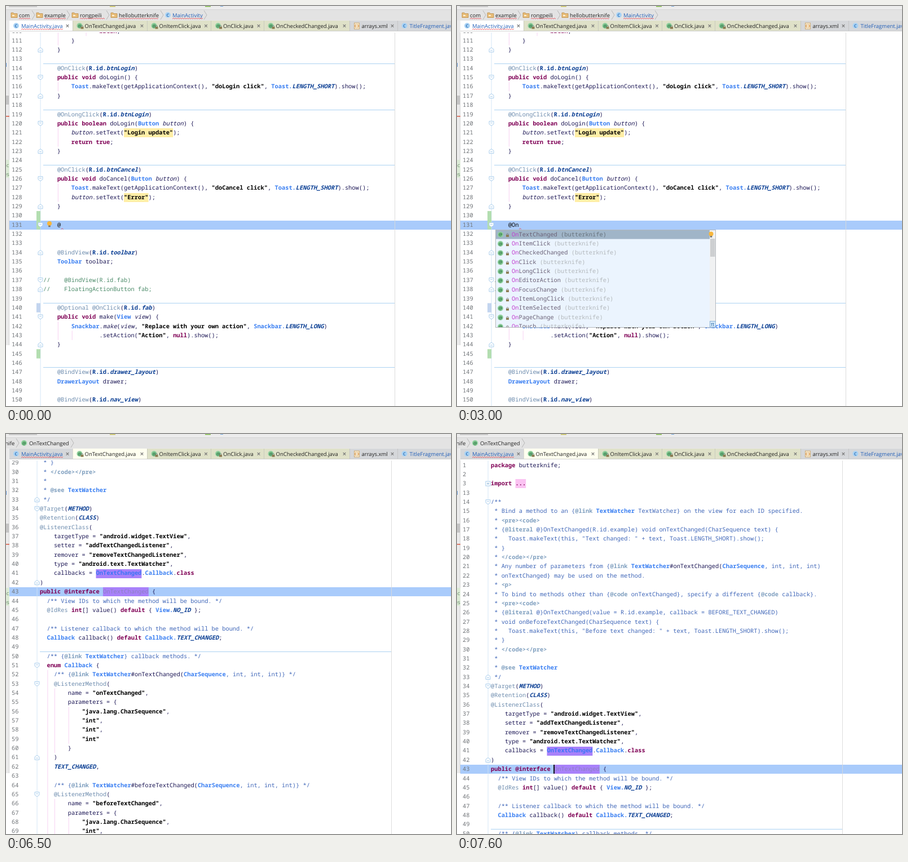
An HTML page for the animation above (8000 ms loop, 789 px wide and 710 px high).

```html
<!DOCTYPE html>
<html lang="en">
<head>
<meta charset="utf-8">
<title>Code editor: annotation completion</title>
<style>
html, body { margin: 0; width: 100%; height: 100%; overflow: hidden; background: #fff; }
svg { display: block; width: 789px; height: 710px; }
text { white-space: pre; text-rendering: geometricPrecision; font: 10.367px "Noto Sans Mono", monospace; }
.ui { font: 9.5px "Open Sans", sans-serif; }
.num { fill: #707478; }
.n { fill: #1c1755; }
.k { fill: #7f0055; font-weight: 700; }
.t { fill: #3a7ff2; font-weight: 600; }
.a { fill: #6d8cae; }
.s, .h { fill: #000; font-weight: 700; }
.c { fill: #0b3f94; font-weight: 700; font-style: italic; }
.r { fill: #0b3f94; font-weight: 700; }
.i { fill: #1c1755; font-style: italic; }
.g { fill: #4a8a68; }
.d { fill: #3f66b8; }
.l { fill: #7f9fbf; font-weight: 600; }
.p { fill: #3a76f5; font-weight: 600; }
.q { fill: #8d82c2; }
.b { fill: #111; }
.e { fill: #6b0f33; font-weight: 500; }
</style>
</head>
<body>
<svg viewBox="0 0 789 710">
  <defs>
    <clipPath id="editor"><rect x="6" y="47" width="783" height="663"/></clipPath>
    <clipPath id="list"><rect x="68" y="397" width="391" height="173"/></clipPath>
  </defs>
  <g id="frame"></g>
  <g id="crumbs"></g>
  <g id="tabs"></g>
  <g clip-path="url(#editor)">
    <g id="main"></g>
    <g id="lib"></g>
  </g>
  <g id="overlay"></g>
</svg>
<script>
const CW = 6.22, ROW = 16.35, LOOP = 8000;
const MAIN_X = 66, LIB_X = 60, CARET_TOP = 380.3;
const $ = id => document.getElementById(id);

const esc = s => s.replace(/&/g, '&amp;').replace(/</g, '&lt;');
const rect = (x, y, w, h, fill, more = '') =>
  `<rect x="${x}" y="${y}" width="${w}" height="${h}" fill="${fill}" ${more}/>`;
// A box behind one text row, on whole pixels
const band = (x, y, w, fill, more) => rect(x, Math.ceil(y), w, 16, fill, more);
const path = (d, stroke, fill = 'none', w = 1) =>
  `<path d="${d}" stroke="${stroke}" fill="${fill}" stroke-width="${w}"/>`;
const text = (x, y, s, cls, more = '') =>
  `<text x="${x}" y="${y}" class="${cls}" ${more}>${esc(s)}</text>`;
const label = (x, y, s, fill = '#222') => text(x, y, s, 'ui', `fill="${fill}"`);

function wave(x, w, y) {
  let d = `M${x} ${y}`;
  for (let i = 1; i * 2 <= w; i++) d += `L${x + i * 2} ${y + (i % 2 ? -1.6 : 0)}`;
  return path(d, '#e8404a', 'none', 0.8);
}

function badge(x, y, letter, fill, ink) {
  return `<circle cx="${x}" cy="${y}" r="5" fill="${fill}"/>` +
    text(x, y + 2.7, letter, 'ui', `fill="${ink}" text-anchor="middle" style="font-size:7.5px;font-weight:600"`);
}
const classIcon = (x, y) => badge(x, y, 'C', '#a9d3f5', '#1d5fa8');
const noteIcon = (x, y) => badge(x, y, '@', '#8ecf9c', '#1f6b38');
const lock = (x, y) => rect(x, y, 5, 3.6, '#8a7a50') +
  path(`M${x + 1} ${y}v-1.5q1.5-1.6 3 0v1.5`, '#777', 'none', 0.9);
const folder = x => path(`M${x} 12h4l1 1.5h6v7h-11z`, '#b98a45', '#e8bd78', 0.8) + rect(x + 2, 16, 4, 2, '#fff2d8');
const chevron = x => path(`M${x - 2} 8l5 8l-5 8`, '#b0b0b0', 'none', 0.9);
const bulb = (x, y) => `<circle cx="${x}" cy="${y}" r="4" fill="#f7b63c"/>` +
  rect(x - 1.8, y + 3.6, 3.6, 2.6, '#77736b');

// "^x" switches to style x
function code(src, x, y) {
  let col = 0, back = '', out = '';
  for (const part of ('^n' + src).split('^').slice(1)) {
    const cls = part[0], s = part.slice(1), at = x + col * CW;
    const fill = { h: '#ffeea6', p: '#a881fa', q: '#a881fa' }[cls];
    if (fill) back += band(at, y, s.length * CW, fill);
    if (s.trim()) out += text(at, y + 11.4, s, cls);
    col += s.length;
  }
  return back + out;
}

function fold(x, y, kind) {
  const c = y + ROW / 2;
  if (kind === '+')
    return rect(x - 4, c - 4, 8, 8, '#fff', 'stroke="#a9cdec"') + path(`M${x - 2} ${c}h4M${x} ${c - 2}v4`, '#8fb6d8');
  const s = kind === 'v' ? 1 : -1;
  return path(`M${x - 4} ${c - 4 * s}h8v${5 * s}l-4 ${3 * s}l-4 ${-3 * s}z`, '#a9cdec', '#fff') +
    path(`M${x - 2} ${c - s}h4`, '#a9cdec');
}

// Draws one file; top(n) gives the upper edge of line n
function sheet(o) {
  const { x, top, active } = o, gx = x - 5;
  const vbar = (c, a, b) => rect(x + c * CW + 1, top(a), 0.9, top(b) - top(a) + ROW, '#f6cdf0');
  let out = band(6, top(active), 783, '#a9cbfb');
  out += rect(gx - 0.4, -400, 0.9, 1700, '#cfe4f6') + rect(x + 623, -400, 0.9, 1700, '#dadada');
  for (const [a, b, fill] of o.changes) out += rect(gx - 7, top(a), 7, top(b) - top(a) + ROW, fill);
  for (const n of o.rules) out += rect(x, Math.floor(top(n)), 623, 1, '#abd2f2');
  for (const g of o.guides) out += vbar(...g);
  for (const [kind, rows] of Object.entries(o.folds)) for (const n of rows) out += fold(gx, top(n), kind);
  o.lines.forEach((s, i) => {
    const n = o.number(i);
    out += text(10, top(n) + 11.4, String(n), 'num') + code(s, x, top(n));
  });
  return out;
}

const mainLines = `                ^kbreak^n;
        }
    }

    ^a@OnClick^n(^rR.id.^cbtnLogin^n)
    ^kpublic void ^ndoLogin() {
        ^tToast^n.makeText(getApplicationContext(), ^s"doLogin click"^n, ^tToast.^cLENGTH_SHORT^n).show();
    }

    ^a@OnLongClick^n(^rR.id.^cbtnLogin^n)
    ^kpublic boolean ^ndoLogin(^tButton ^ibutton^n) {
        ^ibutton^n.setText(^h"Login update"^n);
        ^kreturn true^n;
    }

    ^a@OnClick^n(^rR.id.^cbtnCancel^n)
    ^kpublic void ^ndoCancel(^tButton ^ibutton^n) {
        ^tToast^n.makeText(getApplicationContext(), ^s"doCancel click"^n, ^tToast.^cLENGTH_SHORT^n).show();
        ^ibutton^n.setText(^h"Error"^n);
    }




    ^a@BindView^n(^rR.id.^ctoolbar^n)
    ^tToolbar ^ntoolbar;

^g//    @BindView(R.id.fab)
^g//    FloatingActionButton fab;

    ^a@Optional @OnClick^n(^rR.id.^cfab^n)
    ^kpublic void ^nmake(^tView ^iview^n) {
        ^tSnackbar^n.^imake^n(^iview^n, ^s"Replace with your own action"^n, ^tSnackbar.^cLENGTH_LONG^n)
                .setAction(^s"Action"^n, ^knull^n).show();
    }


    ^a@BindView^n(^rR.id.^cdrawer_layout^n)
    ^tDrawerLayout ^ndrawer;

    ^a@BindView^n(^rR.id.^cnav_view^n)`.split('\n');

const libLines = `^kpackage ^nbutterknife;

^kimport

^d/**
^d * Bind a method to an {^l@link ^tTextWatcher^d TextWatcher} on the view for each ID specified.
^d * ^l<pre><code>
^d * {^l@literal ^d@}OnTextChanged(R.id.example) void onTextChanged(CharSequence text) {
^d *   Toast.makeText(this, "Text changed: " + text, Toast.LENGTH_SHORT).show();
^d * }
^d * ^l</code></pre>
^d * Any number of parameters from {^l@link ^tTextWatcher^n#onTextChanged(^tCharSequence^d, int, int, int)
^d * onTextChanged} may be used on the method.
^d * ^l<p>
^d * To bind to methods other than {^l@code ^donTextChanged}, specify a different {^l@code ^dcallback}.
^d * ^l<pre><code>
^d * {^l@literal ^d@}OnTextChanged(value = R.id.example, callback = BEFORE_TEXT_CHANGED)
^d * void onBeforeTextChanged(CharSequence text) {
^d *   Toast.makeText(this, "Before text changed: " + text, Toast.LENGTH_SHORT).show();
^d * }
^d * ^l</code></pre>
^d *
^d * ^l@see ^tTextWatcher
^d */
^a@Target^n(^cMETHOD^n)
^a@Retention^n(^cCLASS^n)
^a@ListenerClass^n(
    ^ntargetType = ^s"android.widget.TextView"^n,
    ^nsetter = ^s"addTextChangedListener"^n,
    ^nremover = ^s"removeTextChangedListener"^n,
    ^ntype = ^s"android.text.TextWatcher"^n,
    ^ncallbacks = ^pOnTextChanged^n.^tCallback^n.^kclass
)
^kpublic @interface ^qOnTextChanged^n {
  ^d/** View IDs to which the method will be bound. */
  ^a@IdRes ^kint^n[] value() ^kdefault ^n{ ^tView.^cNO_ID ^n};

  ^d/** Listener callback to which the method will be bound. */
  ^tCallback ^ncallback() ^kdefault ^tCallback.^cTEXT_CHANGED^n;

  ^d/** {^l@link ^tTextWatcher^d} callback methods. */
  ^kenum ^tCallback ^n{
    ^d/** {^l@link ^tTextWatcher^n#onTextChanged(^tCharSequence^d, int, int, int)} */
    ^a@ListenerMethod^n(
        name = ^s"onTextChanged"^n,
        parameters = {
            ^s"java.lang.CharSequence"^n,
            ^s"int"^n,
            ^s"int"^n,
            ^s"int"
        }
    )
    ^cTEXT_CHANGED^n,

    ^d/** {^l@link ^tTextWatcher^n#beforeTextChanged(^tCharSequence^d, int, int, int)} */
    ^a@ListenerMethod^n(
        name = ^s"beforeTextChanged"^n,
        parameters = {
            ^s"java.lang.CharSequence"^n,
            ^s"int"^n,`.split('\n');

const libTop = n => 47.2 + (n > 3 ? n - 10 : n - 1) * ROW;
const green = '#b3deb0';

$('main').innerHTML = sheet({
  x: MAIN_X, active: 131, lines: mainLines,
  top: n => CARET_TOP + (n - 131) * ROW, number: i => 110 + i,
  changes: [[130, 131, green], [140, 140, '#c3d5ef'], [145, 145, green]],
  rules: [114, 119, 125, 140, 147],
  guides: [[12, 110, 110], [4, 110, 111], [4, 116, 116], [4, 121, 122], [4, 127, 128], [4, 142, 143], [8, 143, 143]],
  folds: { v: [115, 120, 126, 131, 137, 141], '^': [112, 117, 123, 129, 134, 138, 144] }
}) + '<g id="typed"></g>';

$('lib').innerHTML = sheet({
  x: LIB_X, active: 43, lines: libLines, top: libTop, number: i => i < 3 ? i + 1 : i + 10,
  changes: [], rules: [50],
  guides: [[2, 52, 69], [4, 54, 60], [8, 56, 59], [4, 66, 69], [8, 68, 69]],
  folds: { '+': [3], v: [14, 34, 51, 53, 65], '^': [33, 42, 61] }
}) + band(LIB_X + 7 * CW, libTop(3), 3 * CW, '#fbc3f2') + text(LIB_X + 7 * CW, libTop(3) + 11.4, '...', 'k') +
  band(LIB_X + 18 * CW - 0.8, libTop(43), 1.8, '#000', 'id="libCaret"');

$('frame').innerHTML = rect(0, 0, 789, 47, '#ececec') + rect(0, 6, 789, 0.8, '#cfcfcf') +
  rect(5, 0, 50, 2, '#c9c9c9') + rect(184, 0, 10, 1.5, '#c9c25c') + rect(353, 0, 10, 1.5, '#83bd4b') + rect(380, 0, 5, 1, '#6fa5dc') +
  rect(0, 26, 6, 576, '#ebebeb') + rect(5, 47, 1, 555, '#d2d2d2') +
  rect(0, 159, 5, 16, '#c4c4c4') + rect(0, 195, 6, 1.5, '#d9573f') + rect(0, 273, 6, 32, '#dcebd6') +
  rect(0, 101, 1, 7, '#5b8fd0') +
  label(-5, 286, 'nc', '#6b8f6b') + label(-4, 302, 'es', '#6b8f6b');

function crumbs(inLib) {
  let out = rect(0, 7, 789, 18.5, '#e3e3e3');
  if (inLib)
    return out + label(-1.5, 19.5, 'nife') + chevron(20) + noteIcon(32, 16) + label(41, 19.5, 'OnTextChanged') + chevron(117);
  const parts = [[9, 'com', 48, 20], [54, 'example', 110, 38], [117, 'rongpeili', 180, 44], [186, 'hellobutterknife', 276, 71]];
  for (const [x, s, end, w] of parts)
    out += folder(x) + label(x + 14, 19.5, s) + wave(x + 14, w, 23) + chevron(end);
  return out + classIcon(287, 16) + label(295, 19.5, 'MainActivity', '#2460b8') + wave(295, 54, 23) + chevron(353);
}

function tabs(current) {
  const names = ['MainActivity.java', 'OnTextChanged.java', 'OnItemClick.java', 'OnClick.java',
    'OnCheckedChanged.java', 'arrays.xml', 'TitleFragment.java'];
  const edges = [6, 118.5, 250.5, 364, 457.5, 609.5, 694.5, 795];
  let out = rect(6, 26, 783, 18.5, '#d5d5d5');
  names.forEach((s, i) => {
    const x = edges[i], lib = i > 0 && i < 5, blue = i === 0 || i === 6;
    const fill = i === current ? (lib ? '#fffff0' : '#fff') : lib ? '#dfe1c8' : '#d5d7da';
    out += rect(x, 26, edges[i + 1] - x, 18.5, fill) + rect(edges[i + 1] - 0.5, 26, 1, 18.5, '#b4b4b4');
    if (lib) out += noteIcon(x + 12, 35) + lock(x + 14, 37);
    else if (i === 5) out += rect(x + 8, 30, 9, 11, '#f3e3c4', 'stroke="#c79a58" stroke-width="0.7"') +
      path(`M${x + 11} 33l-2 2.5l2 2.5m3-5l2 2.5l-2 2.5`, '#d4761f');
    else out += classIcon(x + 12, 35);
    out += label(x + 21, 38.7, s, blue ? '#2460b8' : '#222');
    if (i === 0) out += wave(27, 74, 42);
    const c = edges[i + 1] - 9.5;
    if (i < 6) out += path(`M${c - 2.3} 33l4.6 4.6m0-4.6l-4.6 4.6`, '#777', 'none', 1.1);
  });
  return out + rect(6, 44, 783, 0.8, '#bcbcbc') + rect(6, 44.8, 783, 2.4, '#fff');
}

function popup(typed, withBar, withBulb) {
  const names = ['TextChanged', 'ItemClick', 'CheckedChanged', 'Click', 'LongClick', 'EditorAction',
    'FocusChange', 'ItemLongClick', 'ItemSelected', 'PageChange', 'Touch'];
  let out = rect(68.5, 397.5, 390, 173, '#ebf4fe', 'stroke="#b4b8bc"') + rect(69, 398, 379, 15.6, '#a0b5c8');
  out += '<g clip-path="url(#list)">';
  names.forEach((name, i) => {
    const y = 397.2 + i * ROW, s = 'On' + name;
    out += noteIcon(77, y + 8.5) + lock(87, y + 9);
    out += text(97, y + 11.4, s.slice(0, typed), 'b', 'style="fill:#c13fd0"') +
      text(97 + typed * CW, y + 11.4, s.slice(typed), 'b', 'style="fill:#6a6176"') +
      text(97 + (s.length + 1) * CW, y + 11.4, '(butterknife)', 'b', `style="fill:${i ? '#b3b8bc' : '#66727d'}"`);
  });
  out += '</g>';
  if (withBar) out += rect(448, 398, 10, 172, '#f0f1f2') + rect(449, 413, 8.5, 32, '#cdcfd1') +
    rect(448.5, 559.5, 10, 10.5, '#d3e7f8', 'stroke="#8bb3d6"') + label(450, 568, 'π', '#2a6ba8');
  return out + (withBulb ? bulb(450.5, 404.5) : '');
}

const tooltip = () => rect(42.5, 398.5, 198, 25, '#fdfee2', 'stroke="#b0b0a8"') +
  code('^bbutterknife', 45, 398) + code('^kpublic^b @interface ^tOnTextChanged', 45, 410);

// time, typed text, caret column (-1 hides it), extra
const steps = [
  [0, '@', -1, 'bulb'], [700, '@', 5, ''], [1500, '@', -1, 'bulb'], [1600, '@O', -1, ''], [1700, '@O', 6, ''],
  [1900, '@O', 6, 'list'], [2000, '@O', 6, 'list bar'], [2300, '@On', 7, 'list bar'], [2700, '@On', 7, 'list bar hint'],
  [3000, '@On', -1, 'list bar hint'], [3500, '@On', 7, 'list bar hint'], [3900, '@On', -1, 'list bar hint'],
  [4200, '@OnTextChanged', 18, ''], [4500, '@OnTextChanged', 18, 'error'], [5300, '@OnTextChanged', 18, 'error link'],
  [5800, '@OnTextChanged', -1, 'error link'], [6000, '@OnTextChanged', 11, 'error mark']
];
const scrolls = [[6200, -315], [7100, -266], [7200, -168], [7300, -70], [7600, 0]];
const latest = (list, t) => list.filter(s => s[0] <= t).pop();

function drawTyped([, s, caret, extra]) {
  const x = MAIN_X + 4 * CW, end = x + s.length * CW, y = CARET_TOP;
  const has = w => extra.split(' ').includes(w);
  let out = has('mark') ? band(x + CW, y, 13 * CW, '#b57df5') : '';
  out += code(has('link') ? '^e@^tOnTextChanged' : (has('error') ? '^e' : '^b') + s, x, y);
  if (has('link')) out += rect(x + CW, y + 13, 13 * CW, 0.9, '#3a7ff2');
  out += has('error') ? wave(x, s.length * CW, y + 16) : wave(end + 0.5, 5, y + 16);
  if (has('bulb')) out += bulb(77, 386);
  if (caret >= 0) out += band(MAIN_X + caret * CW - 0.5, y, 1.8, '#000');
  $('typed').innerHTML = out;
  $('overlay').innerHTML = has('list') ? popup(s.length - 1, has('bar'), has('hint')) : has('link') ? tooltip() : '';
}

let lastKey = '';
function render(t) {
  const step = latest(steps, t), scroll = latest(scrolls, t), inLib = !!scroll, newCrumbs = t >= 6500;
  const key = [step[0], scroll, newCrumbs].join();
  if (key === lastKey) return;
  lastKey = key;
  drawTyped(step);
  $('main').style.display = inLib ? 'none' : '';
  $('lib').style.display = inLib ? '' : 'none';
  if (inLib) $('lib').setAttribute('transform', `translate(0 ${scroll[1]})`);
  $('libCaret').style.display = t >= 7600 ? '' : 'none';
  $('tabs').innerHTML = tabs(inLib ? 1 : 0);
  $('crumbs').innerHTML = crumbs(newCrumbs);
}

const start = performance.now();
function tick() {
  render((performance.now() - start) % LOOP);
  requestAnimationFrame(tick);
}
tick();
</script>
</body>
</html>
```
